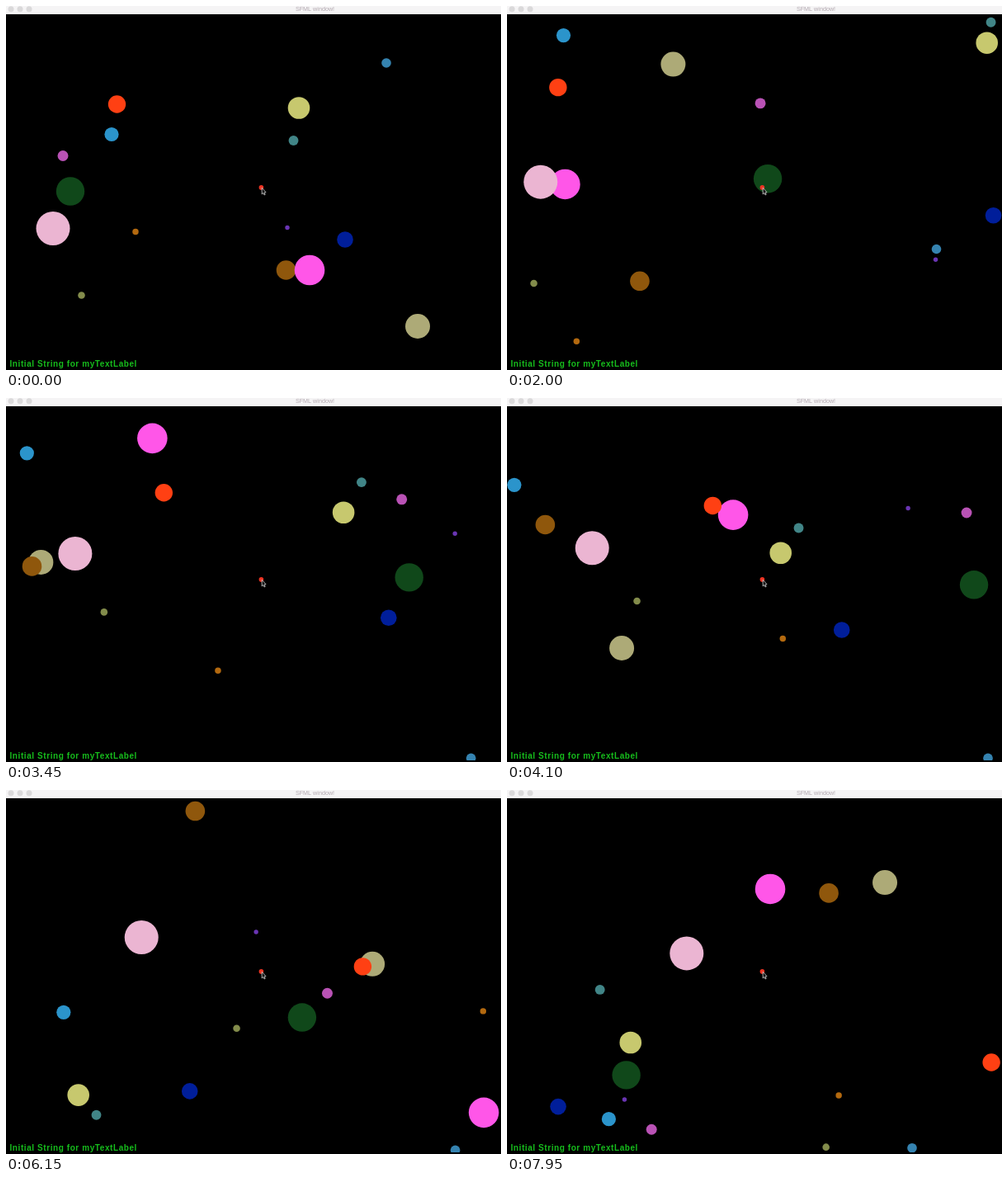
These frames come from a looping animation (600x441 px, 8 s). An HTML page with a canvas:

```html
<!DOCTYPE html>
<html lang="en">
<head>
<meta charset="utf-8">
<title>Bouncing balls</title>
<style>
  html, body { margin: 0; width: 100%; height: 100%; overflow: hidden; background: #000; }
  canvas { display: block; width: 600px; height: 441px; }
</style>
</head>
<body>
<canvas id="stage" width="600" height="441"></canvas>
<script>
const ctx = document.getElementById('stage').getContext('2d');
const FRAME_MS = 50, FRAMES = 160, SUBSTEPS = 10;
const WIDTH = 600, TOP = 10, FLOOR = 440.6, VIEW_BOTTOM = 439;
const SPEED_UNIT = 1.488;  // horizontal speeds are whole multiples of this
const PULL = 0.33;         // downward acceleration is PULL / radius

// color, radius, x, y, horizontal speed in units, vertical speed, wall slack
const balls = [
  ['#adaa77', 15, 499, 388, -5, -8.375, 0.5],
  ['#8f570c', 11.8, 339.5, 320, -3, 4.79, 1.4],
  ['#ff56e8', 18.3, 368, 320, -5, 7.68, 1.8],
  ['#ff4013', 10.7, 134.5, 119, -3, -1.125, 1.3],
  ['#ebb5d2', 20.5, 57, 269.5, -1, -1.73, 0.9],
  ['#2b94cb', 8.6, 128, 155.5, -1, -3.766, 0.7],
  ['#001e9a', 9.8, 411, 283, 3, -1.405, 1.7],
  ['#c7c86e', 13.3, 355, 123.5, 4, -3.5, 1.2],
  ['#418587', 5.95, 348.5, 163, 4, -4.69, 1.5],
  ['#b952b5', 6.47, 69, 181.5, 4, -2.61, 2.25],
  ['#10481a', 17.2, 78, 224.5, 4, -0.765, 2.2],
  ['#b3690f', 3.72, 157, 273.5, -4, 1.545, 1.6],
  ['#838c4b', 4.3, 91.5, 350.5, -2, 4.03, 1.3],
  ['#6a35b4', 2.7, 341, 268.5, 3, 5.92, -0.2],
  ['#3583b0', 5.8, 461, 69, 1, 4.5, 0.6, true]
].map(([color, r, x, y, units, vy, slack, sticks]) =>
  ({ color, r, path: trace(r, x, y, units * SPEED_UNIT, vy, slack, sticks) }));

// Position at every frame of the loop.
function trace(r, x, y, vx, vy, slack, sticks) {
  const left = r - slack - 0.5, right = WIDTH - r + slack - 0.5;
  const top = TOP + r, floor = FLOOR - r;
  const g = PULL / r, dt = 1 / SUBSTEPS, path = [];
  let stuck = false;
  for (let n = 0; n < FRAMES; n++) {
    path.push([x, stuck ? jitter(n) : y]);
    for (let i = 0; i < SUBSTEPS; i++) {
      x += vx * dt;
      if (x < left || x > right) {
        x = 2 * (x < left ? left : right) - x;
        vx = -vx;
      }
      if (stuck) continue;
      y += vy * dt + g * dt * dt / 2;
      vy += g * dt;
      if (y < top || y > floor) {
        stuck = Boolean(sticks) && y > floor;
        y = 2 * (y < top ? top : floor) - y;
        vy = -vy;
      }
    }
  }
  return path;
}

// A ball caught in the floor flips between two heights.
function jitter(n) {
  const phase = n + Math.floor((n - 82) / 35);
  return phase % 2 ? 433.7 : 436.3;
}

function disc(x, y, r, color) {
  ctx.fillStyle = color;
  ctx.beginPath();
  ctx.arc(x, y, r, 0, Math.PI * 2);
  ctx.fill();
}

function drawPointer() {
  disc(309.4, 219.9, 2.8, '#ee3322');
  ctx.beginPath();
  [[310.2, 220.3], [310.2, 228], [311.9, 226.5], [313.1, 229],
   [314.2, 228.4], [313, 226], [315, 225.7]]
    .forEach(([x, y]) => ctx.lineTo(x, y));
  ctx.closePath();
  ctx.fillStyle = '#000';
  ctx.fill();
  ctx.strokeStyle = '#ddd';
  ctx.lineWidth = 0.8;
  ctx.stroke();
}

function drawTitleBar() {
  ctx.fillStyle = '#f5f4f5';
  ctx.fillRect(0, 0, WIDTH, TOP);
  for (const x of [6, 17, 28]) disc(x, 3.7, 3.5, '#dad9da');
  ctx.font = '7.2px "Liberation Sans", sans-serif';
  ctx.textAlign = 'center';
  ctx.letterSpacing = '0px';
  ctx.fillStyle = '#b3a9b0';
  ctx.fillText('SFML window!', 374.5, 6.4);
}

function drawLabel() {
  ctx.font = 'bold 10px "Liberation Sans", sans-serif';
  ctx.textAlign = 'left';
  ctx.letterSpacing = '0.58px';
  ctx.fillStyle = '#16bd1c';
  ctx.fillText('Initial String for myTextLabel', 4.5, 436.8);
}

function draw(now) {
  const n = Math.floor(now / FRAME_MS) % FRAMES;
  ctx.fillStyle = '#000';
  ctx.fillRect(0, 0, WIDTH, 441);
  ctx.save();
  ctx.beginPath();
  ctx.rect(0, TOP, WIDTH, VIEW_BOTTOM - TOP);
  ctx.clip();
  for (const { color, r, path } of balls) disc(...path[n], r, color);
  ctx.restore();
  drawLabel();
  drawPointer();
  drawTitleBar();
}

const start = performance.now();
function tick() {
  draw(performance.now() - start);
  requestAnimationFrame(tick);
}
tick();
</script>
</body>
</html>
```
